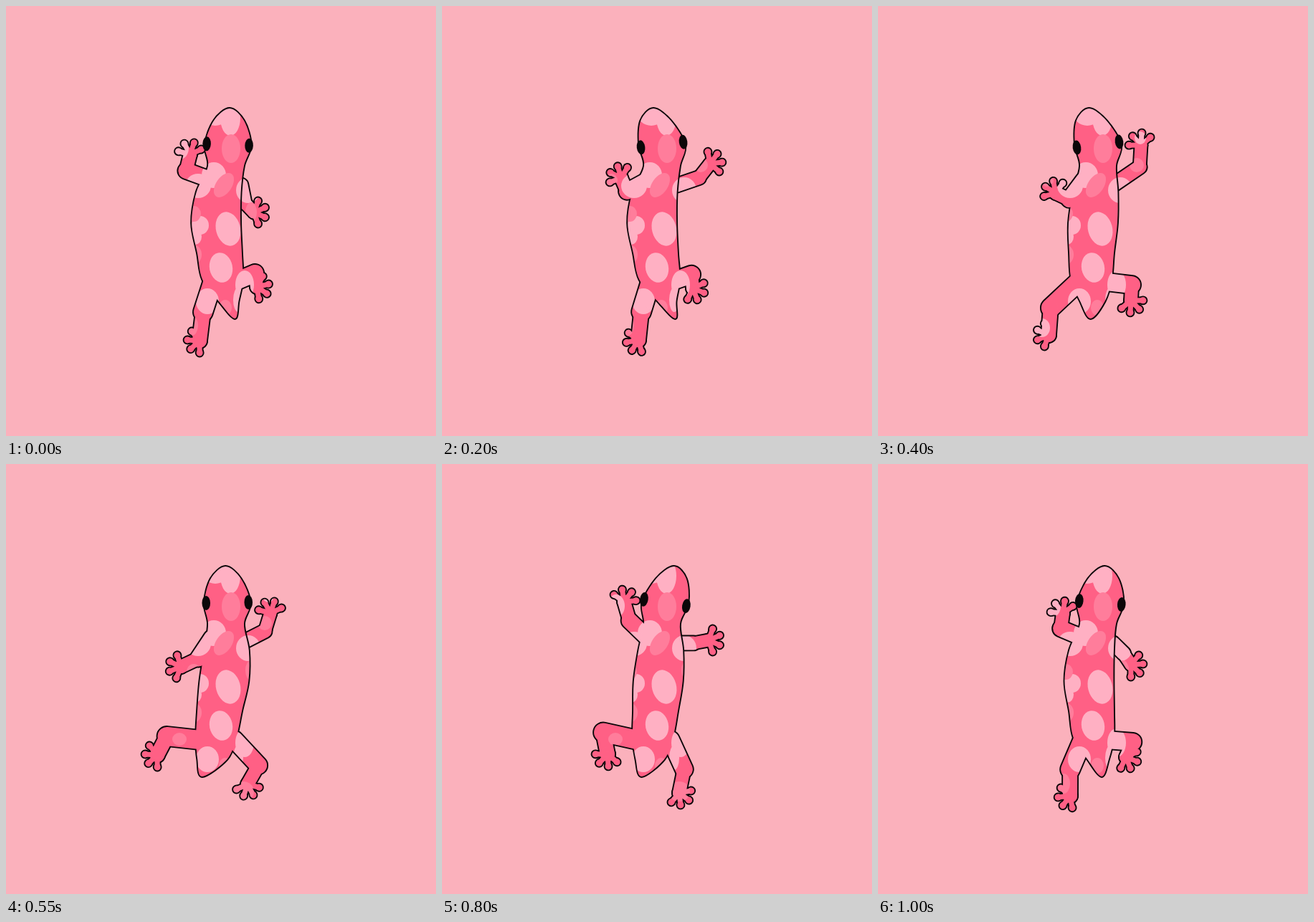
These frames come from a looping animation (600x600 px, 1.05 s). An HTML page with a canvas:

```html
<!DOCTYPE html>
<html lang="en">
<head>
<meta charset="utf-8">
<title>Gecko</title>
<style>
html, body { margin: 0; width: 100%; height: 100%; overflow: hidden; background: #fbb1bc; }
canvas { display: block; width: 600px; height: 600px; }
</style>
</head>
<body>
<canvas id="stage" width="600" height="600"></canvas>
<script>
const ctx = document.getElementById('stage').getContext('2d');
const BG = '#fbb1bc', BASE = '#ff6085', MID = '#ff7d9b', LIGHT = '#ffb0c3', INK = '#0c0709';
const LOOP = 1050, STEP = 50, LINE = 1.9;
const TIMES = [0, 200, 400, 550, 700, 800, 1000];

// Each step of a limb: palm x, palm y, heading in degrees, bend of the joint
const limbs = {
  rightArm: {
    side: 1, upper: 19, lower: 17, root: () => [328, 250],
    keys: [[346,288,0,6], [374,220,-30,8], [367,194,-110,16], [369,208,-95,12],
           [370,223,-90,20], [372,246,0,2], [353,280,20,-2]]
  },
  leftArm: {
    side: -1, upper: 22, lower: 18, root: () => [287, 243],
    keys: [[257,207,-95,19], [250,240,-130,18], [248,261,-125,16], [244,283,-178,8],
           [196,219,-140,8], [254,192,-75,8], [258,208,-105,16]]
  },
  leftLeg: {
    side: 1, upper: 26, lower: 20, root: tail => [280 + 0.4 * tail, 385],
    keys: [[270,467,160,4], [274,466,145,4], [238,459,180,16], [211,406,160,20],
           [207,358,170,50], [231,405,110,30], [268,463,150,8]]
  },
  rightLeg: {
    side: -1, upper: 24, lower: 18, root: () => [319, 385],
    keys: [[350,392,10,18], [350,394,45,18], [353,411,70,18], [337,447,85,22],
           [332,462,60,14], [331,459,60,12], [346,409,45,22]]
  }
};

// Cyclic cubic interpolation between the steps
function pose(rows, t) {
  const n = TIMES.length;
  const time = k => TIMES[(k + n) % n] + Math.floor(k / n) * LOOP;
  let k = n - 1;
  while (TIMES[k] > t) k--;
  const span = time(k + 1) - time(k), u = (t - time(k)) / span;
  const [p, a, b, q] = [-1, 0, 1, 2].map(i => rows[(k + i + n) % n]);
  const ka = span / (time(k + 1) - time(k - 1)), kb = span / (time(k + 2) - time(k));
  const u2 = u * u, u3 = u2 * u;
  return a.map((v, i) =>
    (2 * u3 - 3 * u2 + 1) * v + (u3 - 2 * u2 + u) * (b[i] - p[i]) * ka +
    (3 * u2 - 2 * u3) * b[i] + (u3 - u2) * (q[i] - v) * kb);
}

// The body sways like a wave that runs from nose to tail
const wave = (t, size, peak) => size * Math.cos(2 * Math.PI * (t - peak) / LOOP);
const swayAt = t => ({ nose: wave(t, 16, 830), mid: wave(t, 6.5, 625), tail: wave(t, 30, 130) });

function spline(pts) {
  const path = new Path2D(), n = pts.length;
  const at = i => pts[(i + n) % n];
  path.moveTo(...pts[0]);
  for (let i = 0; i < n; i++) {
    const [p, a, b, q] = [at(i - 1), at(i), at(i + 1), at(i + 2)];
    const d = Math.hypot(b[0] - a[0], b[1] - a[1]);
    const grip = (m, o) => Math.min(1 / 6, 0.34 * d / (Math.hypot(o[0] - m[0], o[1] - m[1]) || 1));
    const ga = grip(p, b), gb = grip(a, q);
    path.bezierCurveTo(
      a[0] + (b[0] - p[0]) * ga, a[1] + (b[1] - p[1]) * ga,
      b[0] - (q[0] - a[0]) * gb, b[1] - (q[1] - a[1]) * gb, ...b);
  }
  path.closePath();
  return path;
}

function bodyPath({ nose, mid, tail }) {
  // centre x, y and half width down the spine
  const spine = [
    [308 + 0.75 * nose, 160, 21],
    [309 + 0.15 * nose, 194, 32],
    [307, 223, 25],
    [302 + mid, 260, 31],
    [298.5 + mid, 303, 34],
    [298, 345, 31],
    [298 + 0.2 * tail, 382, 28],
    [300 + 0.5 * tail, 412, 17 - 0.15 * tail]
  ];
  return spline([
    [308 + nose, 143],
    ...spine.map(([x, y, w]) => [x + w, y]),
    [298 + tail, 436],
    ...spine.reverse().map(([x, y, w]) => [x - w, y])
  ]);
}

// The spots stay still while the silhouette moves across them
function makeSkin() {
  const sheet = document.createElement('canvas');
  sheet.width = sheet.height = 600;
  const g = sheet.getContext('2d');
  g.fillStyle = BASE;
  g.fillRect(0, 0, 600, 600);
  const spot = (color, x, y, rx, ry, tilt = 0) => {
    g.fillStyle = color;
    g.beginPath();
    g.ellipse(x, y, rx, ry, tilt, 0, 7);
    g.fill();
  };
  // head and shoulder
  spot(LIGHT, 313, 156, 14, 25);
  spot(LIGHT, 292, 148, 20, 19);
  spot(MID, 314, 199, 13, 20);
  spot(LIGHT, 290, 236, 17, 18);
  spot(LIGHT, 268, 251, 18, 17);
  spot(MID, 304, 250, 11, 19, 0.6);
  spot(LIGHT, 338, 257, 17, 18);
  // back
  spot(LIGHT, 310, 311, 17, 24, -0.25);
  spot(LIGHT, 300, 365, 16, 21, -0.2);
  spot(LIGHT, 271, 306, 12, 13);
  spot(LIGHT, 264, 322, 9, 11);
  spot(MID, 262, 290, 10, 11);
  spot(MID, 261, 347, 12, 14);
  spot(MID, 342, 288, 8, 14);
  spot(LIGHT, 281, 412, 16, 18);
  spot(MID, 306, 421, 9, 11);
  // limbs
  spot(LIGHT, 333, 389, 13, 20);
  spot(LIGHT, 324, 410, 7, 17);
  spot(MID, 331, 457, 15, 14);
  spot(LIGHT, 243, 198, 12, 16);
  spot(MID, 236, 243, 9, 9);
  spot(LIGHT, 366, 184, 8, 9);
  spot(MID, 361, 222, 10, 10);
  spot(MID, 242, 384, 10, 9);
  spot(LIGHT, 229, 449, 11, 13);
  spot(MID, 259, 446, 9, 14);
  return ctx.createPattern(sheet, 'no-repeat');
}
const skin = makeSkin();

// A limb is a set of round strokes: two bones, a palm and four toes
function limbParts({ side, upper, lower, root, keys }, t, tail) {
  const [x, y, heading, bend] = pose(keys, t);
  const [rx, ry] = root(tail);
  const dx = x - rx, dy = y - ry, len = Math.hypot(dx, dy) || 1;
  const ux = dx / len, uy = dy / len, slide = Math.abs(bend) / 2;
  const joint = [
    (x + rx) / 2 - uy * side * bend + ux * slide,
    (y + ry) / 2 + ux * side * bend + uy * slide
  ];
  const bone = (width, ...pts) => {
    const path = new Path2D();
    pts.forEach(p => path.lineTo(...p));
    return { path, width };
  };
  const parts = [
    bone(upper, [rx, ry], joint),
    bone(lower, joint, [x, y]),
    bone(lower, [x, y], [x + 0.1, y])
  ];
  for (let i = 0; i < 4; i++) {
    const a = (heading + (i - 1.5) * 47) * Math.PI / 180;
    const tip = reach => [x + Math.cos(a) * reach, y + Math.sin(a) * reach];
    parts.push(bone(7, [x, y], tip(17)), bone(9, tip(16.5), tip(17)));
  }
  return parts;
}

// Ink first, then skin, so that only the outline of the whole group remains
function drawGroup(parts, body) {
  for (const [color, extra] of [[INK, 2 * LINE], [skin, 0]]) {
    ctx.strokeStyle = ctx.fillStyle = color;
    for (const { path, width } of parts) {
      ctx.lineWidth = width + extra;
      ctx.stroke(path);
    }
    if (!body) continue;
    ctx.fill(body);
    if (extra) {
      ctx.lineWidth = extra;
      ctx.stroke(body);
    }
  }
}

function drawEyes(nose) {
  const tilt = 0.01 * nose;
  ctx.fillStyle = INK;
  for (const side of [-1, 1]) {
    ctx.beginPath();
    ctx.ellipse(309 + 0.15 * nose + side * 29.5, 193.5 + side * 29.5 * tilt, 5.8, 10, tilt, 0, 7);
    ctx.fill();
  }
}

function draw(t) {
  const sway = swayAt(t);
  ctx.fillStyle = BG;
  ctx.fillRect(0, 0, 600, 600);
  ctx.lineCap = ctx.lineJoin = 'round';
  const { rightArm, ...front } = limbs;
  drawGroup(limbParts(rightArm, t, sway.tail));
  drawGroup(Object.values(front).flatMap(limb => limbParts(limb, t, sway.tail)), bodyPath(sway));
  drawEyes(sway.nose);
}

const start = performance.now();
function tick() {
  const t = (performance.now() - start) % LOOP;
  draw(Math.floor(t / STEP) * STEP);
  requestAnimationFrame(tick);
}
tick();
</script>
</body>
</html>
```
